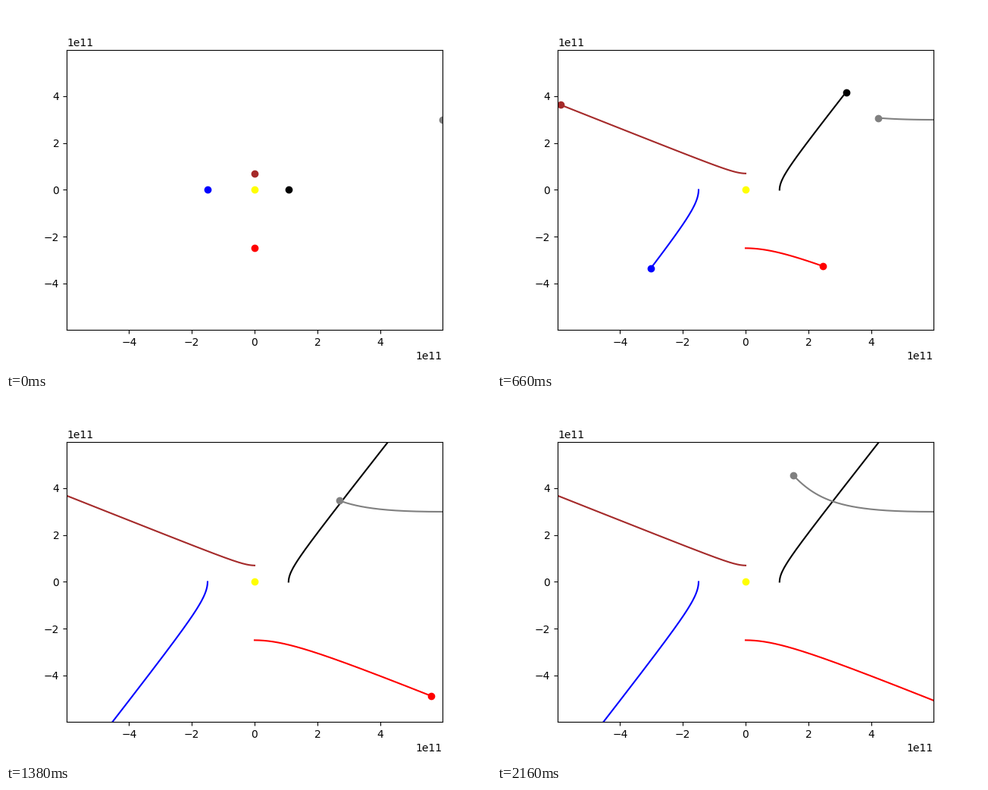
A matplotlib script for the animation above (2220 ms loop, 640 by 480 pixels).

```python
import numpy as np
import matplotlib.pyplot as plt
from matplotlib.animation import FuncAnimation

AU = 149.6e9
GM = 6.67428e-11 * 1.98892e30
DAY = 24 * 3600
DAYS_PER_FRAME = 10
FRAMES = 37

# colour, position in AU, velocity in m/s
BODIES = [
    ("yellow", (0, 0), (0, 0)),
    ("blue", (-1, 0), (0, -29783)),
    ("red", (0, -1.666), (24077, 0)),
    ("brown", (0, 0.467), (-47400, 0)),
    ("black", (0.723, 0), (0, 35020)),
    ("gray", (4, 2), (-20000, 0)),
]


def trajectory(start, velocity):
    """Daily positions of a body pushed away from the centre."""
    pos = np.array(start, float) * AU
    vel = np.array(velocity, float)
    path = [pos]
    for _ in range((FRAMES - 1) * DAYS_PER_FRAME):
        r = np.hypot(*pos)
        if r > 0:
            vel = vel + GM * pos / r**3 * DAY
        pos = pos + vel * DAY
        path.append(pos)
    return np.array(path)


fig, ax = plt.subplots(figsize=(6.4, 4.8), dpi=100)
ax.set_xlim(-4 * AU, 4 * AU)
ax.set_ylim(-4 * AU, 4 * AU)

paths, trails, dots = [], [], []
for color, start, velocity in BODIES:
    paths.append(trajectory(start, velocity))
    trails.append(ax.plot([], [], color=color)[0])
    dots.append(ax.plot([], [], "o", color=color)[0])


def update(frame):
    day = frame * DAYS_PER_FRAME
    for path, trail, dot in zip(paths, trails, dots):
        trail.set_data(*path[:day + 1].T)
        dot.set_data(*path[day:day + 1].T)
    return trails + dots


anim = FuncAnimation(fig, update, frames=FRAMES, interval=60,
                     repeat=True, repeat_delay=0)
plt.show()
```
